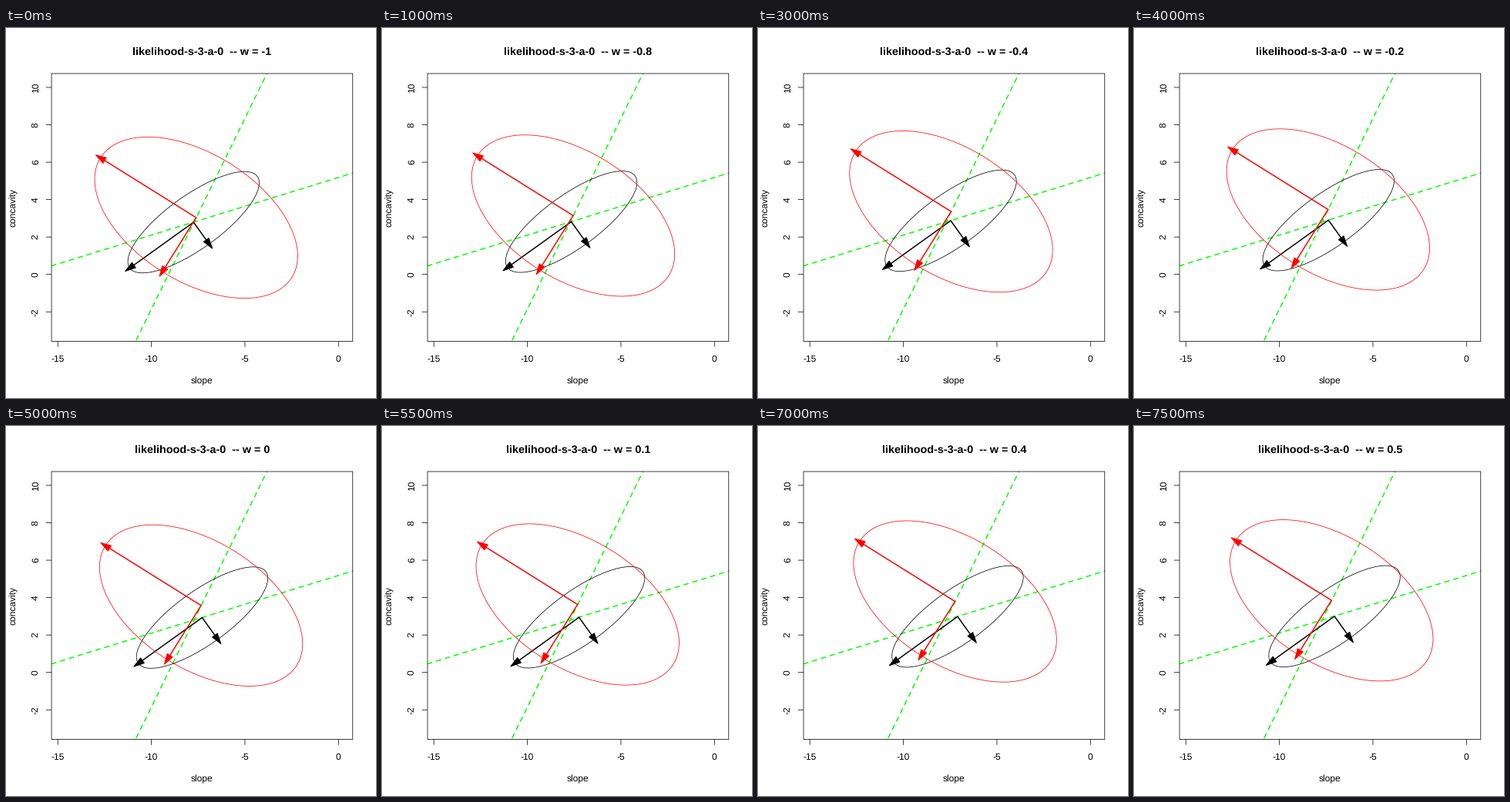
Animation of 480x480 px, one loop 8000 ms. Source, as a matplotlib script:

```python
import numpy as np
import matplotlib.pyplot as plt
from matplotlib.animation import FuncAnimation
from matplotlib.patches import Polygon, Rectangle

plt.rcParams["font.family"] = "Liberation Sans"
plt.rcParams["text.hinting"] = "none"

SIZE, DPI = 480, 72
FRAMES, INTERVAL = 16, 500
LEFT, RIGHT, TOP, BOTTOM = 59.04, 449.76, 59.04, 406.56
MID_X, MID_Y = (LEFT + RIGHT) / 2, (TOP + BOTTOM) / 2
THIN, THICK = 0.75, 1.5
RED, BLACK, GREEN = "#ff0000", "#000000", "#00ff00"

# Stage coordinates are pixels with y pointing down.
fig = plt.figure(figsize=(SIZE / DPI, SIZE / DPI), dpi=DPI, facecolor="white")
ax = fig.add_axes([0, 0, 1, 1])
ax.set_xlim(0, SIZE)
ax.set_ylim(SIZE, 0)
ax.axis("off")


def label(x, y, text, size=12, **kw):
    return ax.text(x, y, text, size=size, ha="center", va="baseline",
                   rotation_mode="anchor", **kw)


def rule(xs, ys):
    ax.plot(xs, ys, color=BLACK, lw=THIN, snap=False,
            solid_capstyle="butt", zorder=6)


def frame_box(**kw):
    return Rectangle((LEFT, TOP), RIGHT - LEFT, BOTTOM - TOP, **kw)


def draw_axes():
    ax.add_patch(frame_box(fill=False, ec=BLACK, lw=THIN, snap=False, zorder=6))
    for v in range(-15, 1, 5):
        x = 431.3 + 24.27 * v
        rule([x, x], [BOTTOM, BOTTOM + 7.2])
        label(x, 432.5, str(v))
    for v in range(-2, 11, 2):
        y = 319.7 - 24.27 * v
        rule([LEFT - 7.2, LEFT], [y, y])
        label(41.8, y, str(v), rotation=90)
    label(MID_X, 461.3, "slope")
    label(13, MID_Y, "concavity", rotation=90)


def guide(xs, ys):
    line, = ax.plot(xs, ys, color=GREEN, lw=THICK, ls=(0, (4, 4)),
                    dash_capstyle="round", zorder=2)
    line.set_clip_path(frame_box(transform=ax.transData))


# Wedge pointing along +x, centred on the end of the shaft.
HEAD = np.array([[7.2, 0], [-6.5, 4.1], [-6.5, -4.1]])


class Arrow:
    def __init__(self, vec, color, z):
        self.vec = vec
        u = vec / np.hypot(*vec)
        self.head = HEAD @ np.array([u, [-u[1], u[0]]])
        self.shaft, = ax.plot([], [], color=color, lw=THICK,
                              solid_capstyle="round", zorder=z)
        self.tip = ax.add_patch(Polygon(self.head, fc=color, ec=color, lw=1,
                                        joinstyle="round", zorder=z))

    def move(self, c):
        end = c + self.vec
        self.shaft.set_data([c[0], end[0]], [c[1], end[1]])
        self.tip.set_xy(self.head + end)


class Region:
    """Ellipse with an arrow along each half axis, drifting in a straight line."""

    def __init__(self, start, step, heading, a, b, color, z):
        self.start, self.step = np.array(start), np.array(step)
        u = np.array(heading) / np.hypot(*heading)
        v = np.array([u[1], -u[0]])
        if v[1] < 0:
            v = -v
        t = np.linspace(0, 2 * np.pi, 361)
        self.path = np.outer(np.cos(t), a * u) + np.outer(np.sin(t), b * v)
        self.curve, = ax.plot([], [], color=color, lw=THIN, zorder=z)
        self.arrows = [Arrow(a * u, color, z + 1), Arrow(b * v, color, z + 1)]

    def move(self, k):
        c = self.start + k * self.step
        self.curve.set_data(*(self.path + c).T)
        for arrow in self.arrows:
            arrow.move(c)


draw_axes()
guide([LEFT, RIGHT], [308.6, 188.2])
guide([132, 367.5], [480, 0])
regions = [
    Region((243.3, 252.0), (1.117, -0.344), (-88.5, 63.5), 101.9, 34.7, BLACK, 3),
    Region((246.7, 246.0), (0.637, -1.317), (-130.5, -81.5), 146.4, 82.8, RED, 4),
]
title = label(MID_X, 34.8, "", size=14.4, weight="bold")


def update(k):
    w = round(-1 + k / 10, 1)
    title.set_text(f"likelihood-s-3-a-0  -- w = {w:g}")
    for region in regions:
        region.move(k)
    return []


anim = FuncAnimation(fig, update, frames=FRAMES, interval=INTERVAL,
                     repeat=True, repeat_delay=0, blit=False)
plt.show()
```
